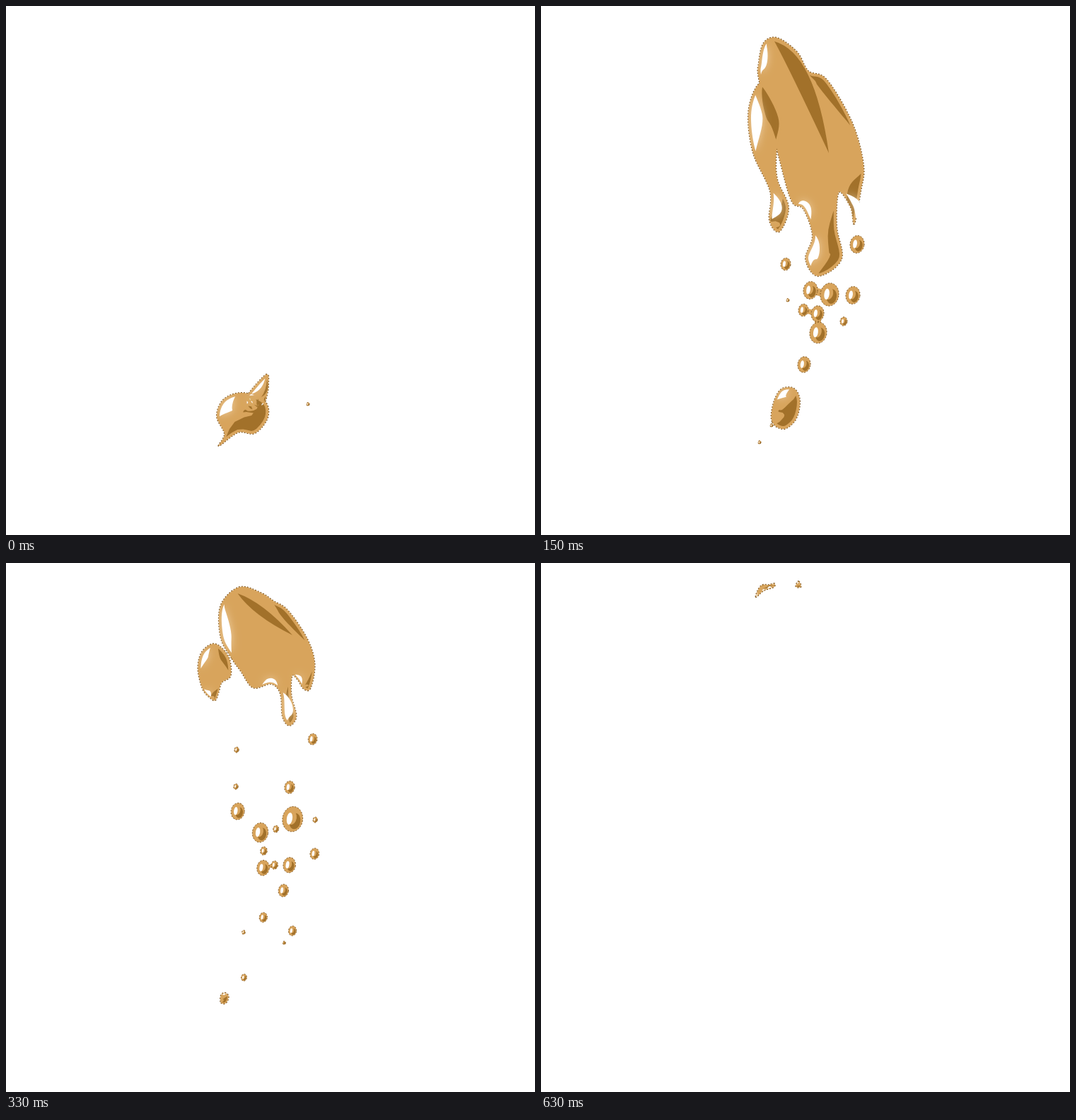
An HTML page with a canvas for the animation above (0.69 s loop, 748 by 748 pixels).

```html
<!DOCTYPE html>
<html lang="en">
<head>
<meta charset="utf-8">
<title>Splash</title>
<style>
  html, body { margin: 0; width: 100%; height: 100%; overflow: hidden; background: #fff; }
  canvas { display: block; width: 748px; height: 748px; }
</style>
</head>
<body>
<canvas id="stage" width="748" height="748"></canvas>
<script>
const ctx = document.getElementById('stage').getContext('2d');
const TAN = '#d8a45c', SHADE = '#a2712a', EDGE = '#7d5520', WHITE = '#fff';
const LOOP = 690, SAMPLES = 126;
const mix = (a, b, f) => a + (b - a) * f;
const mixPoints = (p, q, f) => p.map(([x, y], i) => [mix(x, q[i][0], f), mix(y, q[i][1], f)]);

// Point on the closed Catmull-Rom curve through pts, u in 0..1
function curveAt(pts, u) {
  const n = pts.length, i = Math.floor(u * n), f = u * n - i;
  const [a, b, c, d] = [-1, 0, 1, 2].map(k => pts[(i + k + n) % n]);
  return [0, 1].map(k => b[k] + f / 2 * (c[k] - a[k] +
    f * (2 * a[k] - 5 * b[k] + 4 * c[k] - d[k] + f * (3 * (b[k] - c[k]) + d[k] - a[k]))));
}

const parse = text => text.split(' ').map(p => p.split(',').map(Number));
const smooth = pts => Array.from({ length: SAMPLES }, (_, i) => curveAt(pts, i / SAMPLES));
const track = (poses, shape) => Object.entries(poses).map(([t, text]) => [+t, shape(parse(text))]);

function poseAt(keys, t) {
  const next = keys.findIndex(([time]) => time >= t);
  if (next < 0) return null;
  const [tb, b] = keys[next];
  if (tb === t) return b;
  if (!next) return null;
  const [ta, a] = keys[next - 1];
  return mixPoints(a, b, (t - ta) / (tb - ta));
}

// Outlines run clockwise from the lower left.
// Shade and shine bands follow them: [from, to, thickness / length].
const ball = {
  keys: track({
    0: '301,622 309,605 298,580 308,556 335,547 366,559 370,582 352,604 328,603',
    90: '326,590 325,572 328,548 341,528 362,523 373,540 370,570 352,590 337,592',
    150: '327,588 326,575 331,555 341,541 358,541 366,558 361,583 347,597 335,596',
    270: '311,606 312,592 321,586 329,594 325,606 317,611',
    390: '296,635 296,630 300,630 300,635'
  }, smooth),
  shade: [[0.51, 0.94, 0.42]],
  shine: [[0.22, 0.4, 0.38]]
};
const body = {
  keys: track({
    0: '343,548 368,521 371,535 369,550 365,562 356,568 348,562 344,555',
    90: '356,205 355,172 363,146 378,139 406,155 425,195 443,220 455,275 454,335 449,388 435,412 427,400 423,369 421,420 408,458 381,488 371,455 379,427 371,398 377,350 362,290',
    150: '309,108 308,80 315,52 334,45 362,65 378,92 404,104 440,165 456,225 452,262 443,308 438,285 421,263 418,312 425,358 392,382 374,358 384,325 371,287 354,275 335,208',
    270: '325,148 306,115 303,70 330,34 360,44 382,68 405,82 436,128 449,165 444,212 434,224 424,212 411,201 403,235 416,275 406,293 398,280 397,240 388,226 365,232 340,195',
    390: '313,121 301,95 304,50 330,34 362,41 375,40 392,52 415,85 424,120 417,142 408,132 401,118 398,118 404,140 405,158 396,167 384,155 379,130 362,116 334,121 325,112',
    510: '304,69 302,50 316,33 340,30 356,36 366,50 364,61 353,60 345,53 337,59 328,54 316,62',
    630: '304,48 307,38 313,31 322,31 330,29 329,34 315,39'
  }, smooth),
  shade: [[0.245, 0.335, 0.12], [0.395, 0.475, 0.2], [0.6, 0.715, 0.15]],
  shine: [[0.01, 0.1, 0.16], [0.5, 0.55, 0.3], [0.745, 0.81, 0.3], [0.835, 0.88, 0.3]]
};
const lobe = {
  keys: track({
    0: '358,555 355,570 345,570 340,560 346,548',
    90: '360,207 372,250 374,300 370,332 367,358 357,373 346,352 345,310 336,265 336,225 345,209',
    150: '316,112 340,160 333,205 334,245 350,285 337,319 323,303 324,262 300,208 293,155 302,119',
    270: '305,119 322,140 326,175 314,192 314,218 308,228 302,217 288,198 276,160 278,130 291,116',
    390: '300,117 309,130 309,144 296,146 287,148 284,160 276,165 268,158 267,140 274,125 289,114',
    510: '284,115 284,122 277,124 271,136 267,131 275,119'
  }, smooth),
  shade: [[0, 0.15, 0.2], [0.33, 0.5, 0.35]],
  shine: [[0.73, 0.89, 0.2], [0.55, 0.63, 0.35]]
};
const chip = {
  keys: track({
    390: '375,42 388,49 407,77 422,122 417,140 408,130 387,72',
    510: '365,30 375,33 386,48 390,66 381,68 376,55 368,40',
    630: '364,26 367,30 367,34 361,34 361,30'
  }, smooth),
  shade: [[0.28, 0.64, 0.25]],
  shine: [[0.83, 0.99, 0.3]]
};
const forms = [ball, body, lobe, chip];

// Fold across the body: start, control and end of a tapered stroke
const fold = track({
  0: '369,528 371,545 361,553',
  90: '385,142 418,170 428,264',
  150: '330,50 368,75 407,208',
  270: '345,38 368,95 434,138',
  390: '310,48 345,35 376,66',
  510: '338,48 358,38 365,58',
  630: '314,36 322,34 329,31'
}, pts => pts);

// Each burst lists x,y,radius of its drops at one moment
const bursts = [
  { from: 0, to: 30, at: 0, drops: '427,563,2' },
  { from: 60, to: 120, at: 90, drops: '435,437,8 390,504,10 374,517,11 326,600,5 315,612,2' },
  { from: 120, to: 210, at: 150, drops: '447,337,10 346,365,7 441,409,10 349,416,2 381,402,10 408,408,13 391,435,9 371,430,7 428,446,5 392,462,12 372,507,9 326,593,2 309,617,2' },
  { from: 210, to: 570, at: 270, drops: '329,225,4 436,210,8 406,278,9 330,277,4 334,312,12 444,324,4 412,323,18 389,337,5 367,342,14 373,368,6 445,372,8 373,392,11 389,388,6 410,388,11 403,424,9 376,462,7 349,483,3 418,481,7 407,498,2.5 352,547,5' }
].map(burst => ({ ...burst, drops: parse(burst.drops) }));

// Falling distance: gathers speed, then is held back by drag
const fall = t => 103 * Math.tanh((t - 330) / 150);

function dropsAt(t) {
  const burst = bursts.find(b => t >= b.from && t < b.to);
  if (!burst) return [];
  const dy = fall(t) - fall(burst.at);
  const size = Math.min(1.15, 1 - (t - burst.at) / 290);
  return burst.drops
    .map(([x, y, r]) => [x - dy * (0.15 + (y - 300) / 1000), y + dy, r * size])
    .filter(([, , r]) => r > 1);
}

function polygon(pts, color) {
  ctx.beginPath();
  pts.forEach(p => ctx.lineTo(...p));
  ctx.closePath();
  if (color) {
    ctx.fillStyle = color;
    ctx.fill();
  }
}

// Tapered sliver along the inside of an outline
function band(outline, [from, to, ratio], color) {
  const a = curveAt(outline, from), b = curveAt(outline, to);
  const length = Math.hypot(b[0] - a[0], b[1] - a[1]), inset = Math.min(4, length * 0.12);
  const outer = [], inner = [];
  for (let s = 0; s <= 1; s += 1 / 16) {
    const u = mix(from, to, s), [x, y] = curveAt(outline, u), [x2, y2] = curveAt(outline, (u + 0.005) % 1);
    const d = Math.hypot(x2 - x, y2 - y) || 1, nx = (y - y2) / d, ny = (x2 - x) / d;
    const depth = inset + length * ratio * Math.sin(Math.PI * s);
    outer.push([x + nx * inset, y + ny * inset]);
    inner.unshift([x + nx * depth, y + ny * depth]);
  }
  polygon([...outer, ...inner], color);
}

function drawFold([a, c, b]) {
  const dx = b[0] - a[0], dy = b[1] - a[1];
  ctx.fillStyle = SHADE;
  ctx.beginPath();
  ctx.moveTo(...a);
  for (const side of [0.12, -0.12]) {
    const end = side > 0 ? b : a;
    ctx.quadraticCurveTo(c[0] + dy * side, c[1] - dx * side, ...end);
  }
  ctx.fill();
}

function oval(x, y, rx, ry, color) {
  ctx.fillStyle = color;
  ctx.beginPath();
  ctx.ellipse(x, y, rx, ry, 0.15, 0, 2 * Math.PI);
  ctx.fill();
}

function drawDrop([x, y, r]) {
  oval(x, y, r, r * 1.25, TAN);
  ctx.stroke();
  oval(x + r * 0.22, y + r * 0.2, r * 0.55, r * 0.8, SHADE);
  if (r < 2) return;
  oval(x - r * 0.1, y - r * 0.15, r * 0.5, r * 0.7, TAN);
  oval(x - r * 0.3, y - r * 0.05, r * 0.28, r * 0.6, WHITE);
}

// Drops that nearly touch stay joined by a thin neck
function drawNecks(drops) {
  ctx.strokeStyle = TAN;
  drops.forEach(([x, y, r], i) => drops.slice(i + 1).forEach(([x2, y2, r2]) => {
    if (Math.hypot(x2 - x, y2 - y) > (r + r2) * 1.2 + 2) return;
    ctx.lineWidth = Math.min(r, r2);
    ctx.beginPath();
    ctx.moveTo(x, y);
    ctx.lineTo(x2, y2);
    ctx.stroke();
  }));
}

function draw(t) {
  const drops = dropsAt(t), foldPose = poseAt(fold, t);
  const visible = forms.map(f => ({ ...f, outline: poseAt(f.keys, t) })).filter(f => f.outline);
  ctx.clearRect(0, 0, 748, 748);
  ctx.setLineDash([]);
  drawNecks(drops);
  ctx.strokeStyle = EDGE;
  ctx.lineWidth = 1;
  ctx.setLineDash([2, 2]);
  drops.forEach(drawDrop);
  ctx.lineWidth = 2;
  visible.forEach(f => { polygon(f.outline); ctx.stroke(); });
  visible.forEach(f => polygon(f.outline, TAN));

  ctx.save();
  ctx.globalCompositeOperation = 'source-atop';
  visible.forEach(f => f.shade.forEach(s => band(f.outline, s, SHADE)));
  if (foldPose) drawFold(foldPose);
  ctx.shadowColor = 'rgba(255, 238, 212, 0.6)';
  ctx.shadowBlur = 12;
  visible.forEach(f => f.shine.forEach(s => band(f.outline, s, WHITE)));
  ctx.restore();
}

// Quick steps during the launch, slower ones afterwards
const start = performance.now();
function tick() {
  const t = (performance.now() - start) % LOOP;
  const [base, step] = t < 150 ? [0, 30] : [150, 60];
  draw(base + Math.floor((t - base) / step) * step);
  requestAnimationFrame(tick);
}
tick();
</script>
</body>
</html>
```
